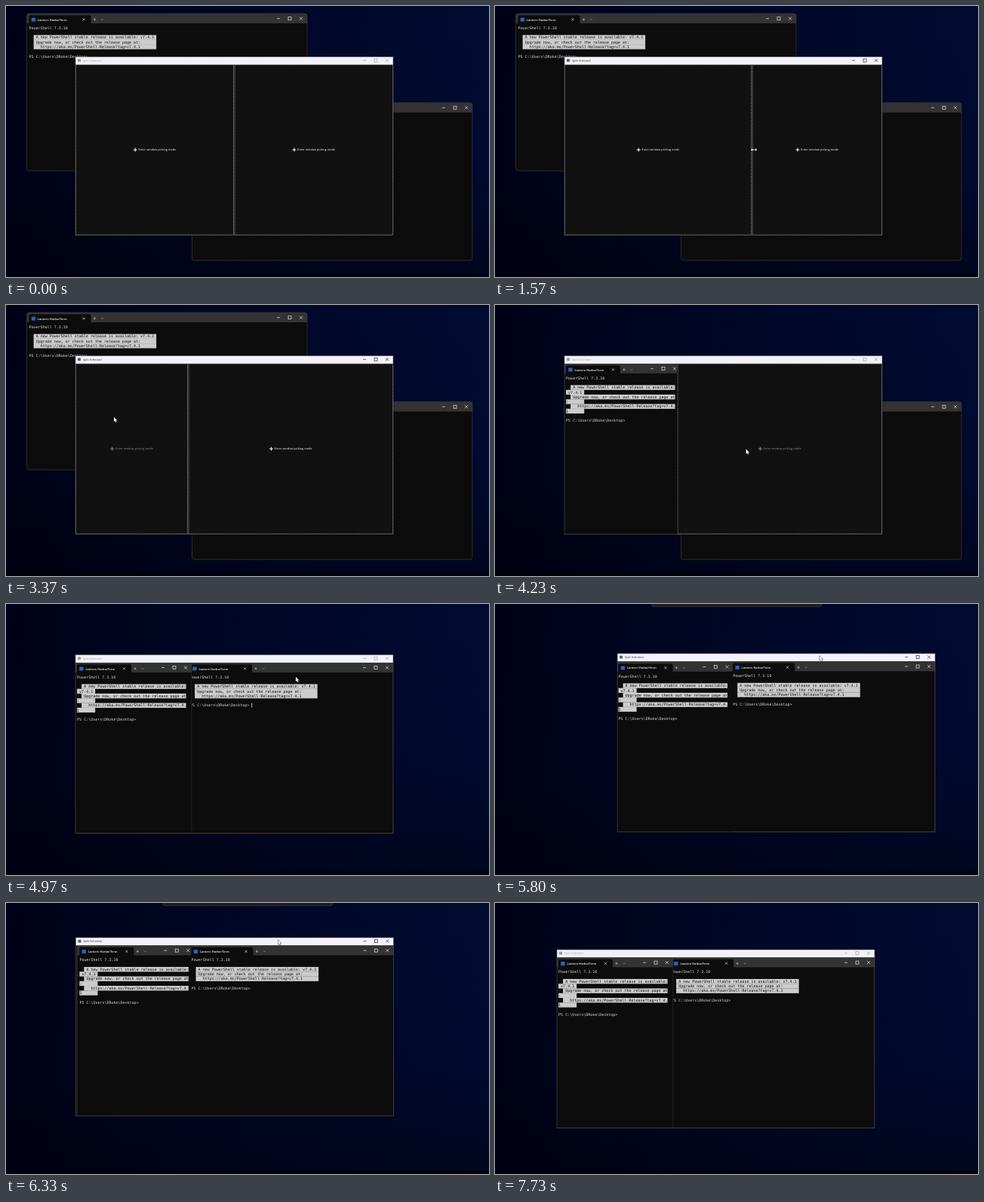
Animation, 640 px wide and 360 px high, one loop 7.8 s. Source, as an HTML page with a canvas:

```html
<!DOCTYPE html>
<html lang="en">
<head>
<meta charset="utf-8">
<title>Split windows</title>
<style>
html, body { margin: 0; width: 100%; height: 100%; overflow: hidden; background: #00041c; }
canvas { display: block; width: 640px; height: 360px; }
</style>
</head>
<body>
<canvas id="stage"></canvas>
<script>
const LOOP = 7800;
const W = 640, H = 360;
const WIN_W = 421, WIN_H = 237, BAR_H = 10.4;
const CHAR = 3.01, ROW = 6.27;
const UI = '"Open Sans", "Noto Sans", sans-serif';
const MONO = '5px "DejaVu Sans Mono", monospace';

const canvas = document.getElementById('stage');
const ratio = window.devicePixelRatio || 1;
canvas.width = W * ratio;
canvas.height = H * ratio;
const c = canvas.getContext('2d');

const sky = c.createLinearGradient(0, 0, W, 30);
sky.addColorStop(0, '#000117');
sky.addColorStop(0.3, '#000520');
sky.addColorStop(0.6, '#010829');
sky.addColorStop(1, '#010a30');
const shade = c.createLinearGradient(0, 0, 0, H);
shade.addColorStop(0, 'rgba(0,0,10,0)');
shade.addColorStop(0.6, 'rgba(0,0,10,0.05)');
shade.addColorStop(1, 'rgba(0,0,10,0.45)');

const BANNER = [
  '   A new PowerShell stable release is available: v7.4.1',
  '   Upgrade now, or check out the release page at:',
  '     https://aka.ms/PowerShell-Release?tag=v7.4.1'
];
const PROMPT = 'PS C:\\Users\\DRoke\\Desktop>';

// Keys are [time, value, value...]
const divider = [
  [1300, 302.5], [1570, 340.5], [1790, 376], [2070, 312], [2100, 303],
  [2430, 230], [2630, 241.5]
];
const pointer = [
  [300, 577, 212], [630, 297, 190], [800, 297, 190], [1030, 303, 191],
  [2630, 244, 191], [2800, 244, 191], [3200, 143, 149], [3370, 143, 149],
  [3620, 75, 110], [3750, 75, 110], [4130, 250, 180], [4300, 365, 195],
  [4350, 365, 195], [4580, 565, 230], [4680, 565, 230], [4930, 384, 97],
  [4970, 384, 97], [5430, 360, 70.5]
];
const drag = [
  [5600, 92, 67.5], [5700, 130, 75], [5800, 162, 66], [5840, 165, 60],
  [5910, 146, 47], [6000, 95, 46], [6060, 75, 58], [6130, 105, 75],
  [6220, 162, 62], [6260, 150, 49], [6330, 93, 46], [6375, 76, 53],
  [6460, 88, 69], [6570, 150, 70], [6620, 164, 61], [6700, 145, 48],
  [6840, 90, 49], [6920, 82, 57], [7070, 82, 62]
];

// Monotone cubic interpolation, flat at turning points
function track(keys, t) {
  const last = keys.length - 1;
  if (t <= keys[0][0]) return keys[0].slice(1);
  if (t >= keys[last][0]) return keys[last].slice(1);
  let i = 0;
  while (t > keys[i + 1][0]) i++;
  const a = keys[i], b = keys[i + 1], span = b[0] - a[0], u = (t - a[0]) / span;
  const slope = (n, k) =>
    n < 0 || n >= last ? 0 : (keys[n + 1][k] - keys[n][k]) / (keys[n + 1][0] - keys[n][0]);
  const tangent = (n, k) => {
    const p = slope(n - 1, k), q = slope(n, k);
    return p * q <= 0 ? 0 : 2 * p * q / (p + q);
  };
  return a.slice(1).map((v, j) => {
    const k = j + 1, w = b[k], m = tangent(i, k) * span, n = tangent(i + 1, k) * span;
    const u2 = u * u, u3 = u2 * u;
    return v * (2 * u3 - 3 * u2 + 1) + m * (u3 - 2 * u2 + u) + w * (3 * u2 - 2 * u3) + n * (u3 - u2);
  });
}

const between = (t, a, b) => t >= a && t < b;

function rect(x, y, w, h, color) {
  c.fillStyle = color;
  c.fillRect(x, y, w, h);
}

function text(str, x, y, font, color) {
  c.font = font;
  c.fillStyle = color;
  c.fillText(str, x, y);
}

function lines(color, width, ...paths) {
  c.strokeStyle = color;
  c.lineWidth = width;
  c.beginPath();
  for (const [x, y, ...rest] of paths) {
    c.moveTo(x, y);
    for (let i = 0; i < rest.length; i += 2) c.lineTo(rest[i], rest[i + 1]);
  }
  c.stroke();
}

function cross(x, y, r, color) {
  lines(color, 0.7, [x - r, y - r, x + r, y + r], [x - r, y + r, x + r, y - r]);
}

function plus(x, y, r, color, width) {
  lines(color, width, [x - r, y, x + r, y], [x, y - r, x, y + r]);
}

function winButtons(right, y, color) {
  lines(color, 0.7, [right - 40, y, right - 36, y]);
  c.strokeRect(right - 25, y - 2, 4, 4);
  cross(right - 8, y, 2, color);
}

function rounded(x, y, w, h, r) {
  c.beginPath();
  c.roundRect(x, y, w, h, r);
}

function termText(x, y, cols) {
  let row = 0;
  const left = x + 3.1;
  const put = (str, color) => text(str, left, y + 20.9 + ROW * row, MONO, color);
  put('PowerShell 7.3.10', '#d8d8d8');
  row = 2;
  for (const line of BANNER) {
    const full = line.padEnd(56);
    for (let at = 0; at < full.length; at += cols) {
      const part = full.slice(at, at + cols), skip = at ? 0 : 2;
      rect(left + skip * CHAR, y + 16 + ROW * row, (part.length - skip) * CHAR, ROW + 0.1, '#cccccc');
      put(part, '#111');
      row++;
    }
  }
  row++;
  put(PROMPT, '#d8d8d8');
  return [left + 27 * CHAR, y + 16 + ROW * row];
}

function terminal(x, y, w, h, { radius = 0, cols = 56, tab = 82, caret = false } = {}) {
  c.save();
  rounded(x, y, w, h, radius);
  c.clip();
  rect(x, y, w, h, '#0c0c0c');
  rect(x, y, w, 13, '#333333');
  c.fillStyle = '#0c0c0c';
  rounded(x + 3, y + 2.3, tab, 12, 2);
  c.fill();
  rect(x + 6.2, y + 5.6, 5.4, 5, '#2d62b5');
  text('Lantern HarborTerm', x + 14.5, y + 9.6, '600 3.9px ' + UI, '#f4f4f4');
  cross(x + tab - 6.5, y + 7.9, 1.5, '#ddd');
  plus(x + tab + 8, y + 7.9, 1.7, '#ccc', 0.6);
  const v = x + tab + 18;
  lines('#aaa', 0.6, [v - 1.4, y + 7.2, v, y + 8.6, v + 1.4, y + 7.2]);
  winButtons(x + w, y + 6.7, '#e6e6e6');
  const [cx, cy] = termText(x, y, cols);
  if (caret) rect(cx, cy, 0.8, 6, '#eee');
  c.restore();
  c.strokeStyle = '#3c3c40';
  c.lineWidth = 0.7;
  rounded(x, y, w, h, radius);
  c.stroke();
}

function panel(x1, x2, y, dim) {
  c.setLineDash([1.6, 0.9]);
  c.strokeStyle = '#a0a0a0';
  c.lineWidth = 0.8;
  c.strokeRect(x1, y + 10.6, x2 - x1, WIN_H - 11);
  c.setLineDash([]);
  const mid = (x1 + x2) / 2, color = dim ? '#8c8c8c' : '#ffffff';
  plus(mid - 25.8, y + 123.5, 2.5, color, 1);
  text('Enter window picking mode', mid - 21.5, y + 124.9, '3.88px ' + UI, color);
}

function splitWindow(t, x, y, mouse) {
  const active = between(t, 1300, 3400) || between(t, 4300, 4680) || between(t, 5600, 7730);
  const dragging = between(t, 5600, 7285);
  c.save();
  c.shadowColor = 'rgba(0,0,0,0.5)';
  c.shadowBlur = 4 * ratio;
  c.shadowOffsetY = ratio;
  rect(x, y, WIN_W, WIN_H, '#111111');
  c.restore();

  rect(x, y, WIN_W, BAR_H, active ? '#f4f3fb' : '#f1f2f7');
  const ink = active ? '#252528' : '#a0a0a5';
  rect(x + 3, y + 2.8, 4, 3.8, active ? '#4b667a' : '#93a0aa');
  text('Split Schnitzel', x + 10, y + 6.1, '3.85px ' + UI, ink);
  winButtons(x + WIN_W, y + 4.7, ink);

  const d = track(divider, t)[0];
  const leftIn = t >= 3750, rightIn = t >= 4680;
  const inside = (a, b) =>
    mouse && !mouse.resize && mouse.x > a && mouse.x < b && mouse.y > y + BAR_H && mouse.y < y + WIN_H;
  if (!leftIn) panel(x + 0.5, x + d - 93, y, inside(x, x + d - 93));
  if (!rightIn) panel(x + d - 91.5, x + WIN_W - 0.5, y, inside(x + d - 91, x + WIN_W));

  if (leftIn) {
    const [px, py] = dragging ? track(drag, t - 5) : [x, y];
    const edge = rightIn ? 155 : d - 92;
    c.save();
    c.beginPath();
    c.rect(x, y + BAR_H, edge, WIN_H - BAR_H);
    c.clip();
    terminal(px - 1, py + BAR_H, 155, WIN_H - BAR_H, { cols: 48, tab: 72 });
    c.restore();
  }
  if (rightIn) {
    const edge = dragging ? 152 : 154.4;
    c.save();
    c.beginPath();
    c.rect(x + edge, y + BAR_H, WIN_W - edge, WIN_H - BAR_H);
    c.clip();
    terminal(x + (dragging ? 150 : 149), y + BAR_H, dragging ? 271 : 272, WIN_H - BAR_H,
      { caret: between(t, 4700, 5400) });
    c.restore();
  }
  c.strokeStyle = '#55555a';
  c.lineWidth = 0.6;
  c.strokeRect(x, y, WIN_W, WIN_H);
}

function mouseAt(t, x, y) {
  if (!between(t, 300, 7070)) return null;
  if (t >= 5600) return { x: x + 268, y: y + 3 };
  if (between(t, 1030, 2800)) return { x: track(divider, t)[0] + 2.5, y: 191, resize: true };
  const [mx, my] = track(pointer, t);
  return { x: mx, y: my, resize: between(t, 900, 1030) };
}

function drawMouse({ x, y, resize }) {
  if (resize) {
    lines('#fff', 0.9, [x - 3, y, x + 3, y]);
    c.fillStyle = '#fff';
    for (const s of [-1, 1]) {
      c.beginPath();
      c.moveTo(x + s * 4, y);
      c.lineTo(x + s * 2, y - 1.7);
      c.lineTo(x + s * 2, y + 1.7);
      c.fill();
    }
    return;
  }
  c.beginPath();
  const shape = [[0, 0], [0, 6], [1.4, 4.8], [2.4, 7], [3.4, 6.5], [2.5, 4.4], [4.3, 4.3]];
  for (const [dx, dy] of shape) c.lineTo(x + dx, y + dy);
  c.closePath();
  c.strokeStyle = '#222';
  c.lineWidth = 0.9;
  c.stroke();
  c.fillStyle = '#fff';
  c.fill();
}

function draw(t) {
  c.setTransform(ratio, 0, 0, ratio, 0, 0);
  rect(0, 0, W, H, sky);
  rect(0, 0, W, H, shade);
  rect(0, 355.5, W, 4.5, '#01020c');

  if (t < 3750) terminal(27.5, 10, 371.5, 209, { radius: 3 });
  if (t < 4680) terminal(246.5, 128.5, 371.5, 209.5, { radius: 3 });

  const [x, y] = track(drag, t);
  const mouse = mouseAt(t, x, y);
  if (between(t, 5640, 7040)) {
    c.fillStyle = '#1d1d20';
    rounded(207.5, -6, 225.5, 9.6, 3);
    c.fill();
    c.strokeStyle = '#3a3a3e';
    c.lineWidth = 0.7;
    c.stroke();
  }
  splitWindow(t, x, y, mouse);
  if (mouse) drawMouse(mouse);
}

const start = performance.now();
function tick() {
  draw((performance.now() - start) % LOOP);
  requestAnimationFrame(tick);
}
tick();
</script>
</body>
</html>
```
